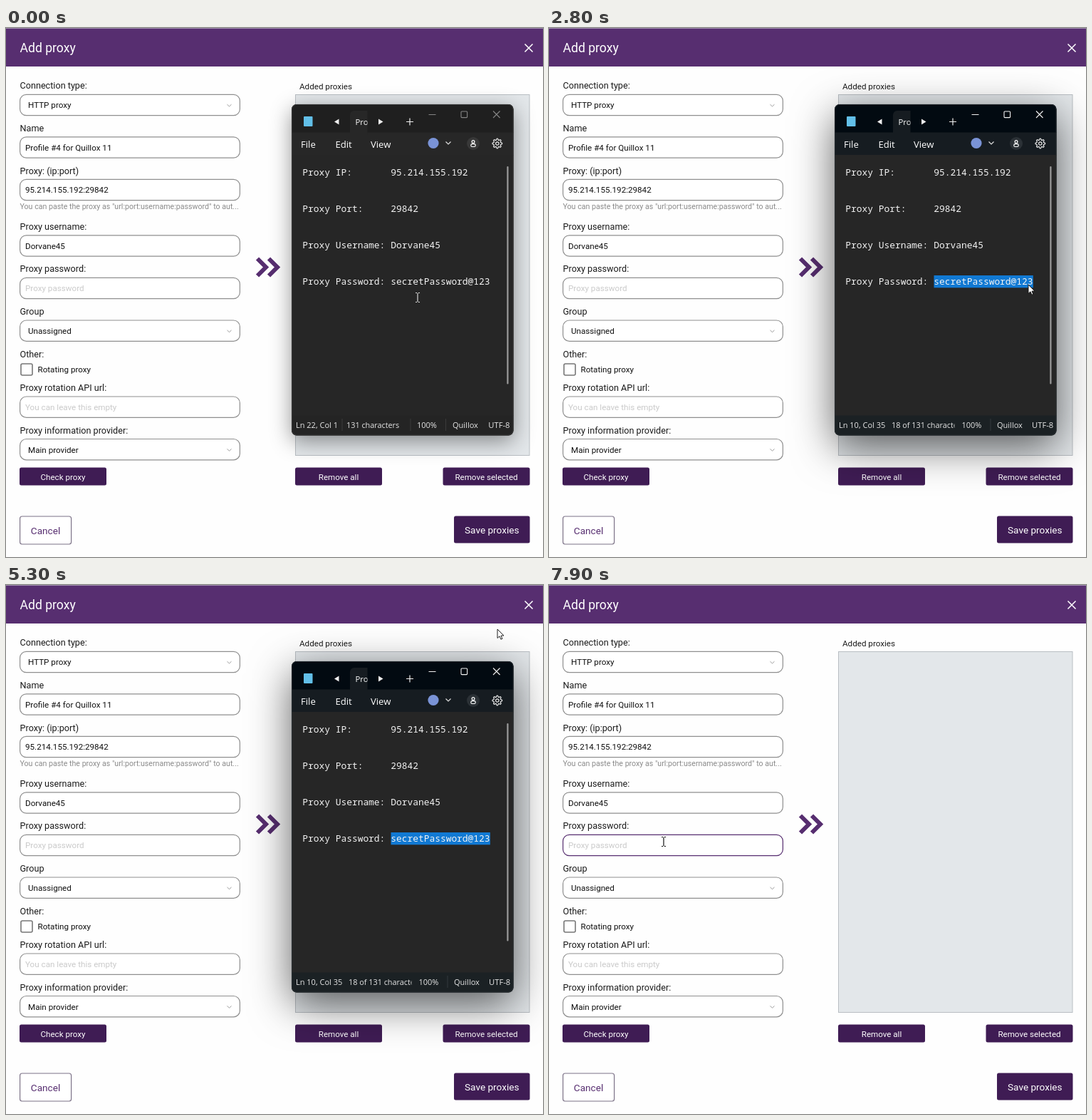
These frames come from a looping animation (754x742 px, 8000 ms). An HTML page with a canvas:

```html
<!DOCTYPE html>
<html lang="en">
<head>
<meta charset="utf-8">
<title>Add proxy</title>
<style>
html, body { margin: 0; width: 100%; height: 100%; overflow: hidden; background: #fff; }
canvas { display: block; width: 754px; height: 742px; }
</style>
</head>
<body>
<canvas id="stage"></canvas>
<script>
const W = 754, H = 742, LOOP = 8000;
const cv = document.getElementById('stage');
const dpr = window.devicePixelRatio || 1;
cv.width = W * dpr;
cv.height = H * dpr;
const c = cv.getContext('2d');

const UI = 'Roboto, sans-serif';
const WIN = '"Open Sans", sans-serif';
const MONO = '"Noto Sans Mono", monospace';
const PURPLE = '#572e70', DARK = '#3f1c54';
const USER = 'Dorvane45', SECRET = 'secretPassword@123';
const CHAR = 7.74, SEL_X = 540.5;

// Event times in ms
const PRESS = 1100, RELEASE = 2400, MENU_OPEN = 3500, MENU_CLOSE = 4850, CLICK = 7500;

// Pointer stops: time, x, y
const PATH = [
  [0, 578, 378], [400, 578, 378], [1000, 540, 357], [1150, 540, 357],
  [1500, 578, 361], [2250, 684, 363], [2450, 684, 363], [2750, 673, 360],
  [3000, 673, 360], [3300, 645, 356], [3800, 645, 356], [4300, 665, 175],
  [4700, 690, 62], [5500, 690, 62], [6900, 162, 360], [7400, 162, 360],
  [7600, 161, 360], [8000, 161, 360]
];

const clamp = v => Math.max(0, Math.min(1, v));
const smooth = v => v * v * (3 - 2 * v);

function pointer(t) {
  let i = 0;
  while (i < PATH.length - 2 && t >= PATH[i + 1][0]) i++;
  const [t0, x0, y0] = PATH[i], [t1, x1, y1] = PATH[i + 1];
  const k = smooth(clamp((t - t0) / (t1 - t0)));
  return { x: x0 + (x1 - x0) * k, y: y0 + (y1 - y0) * k };
}

function text(s, x, y, size, color, font = UI, align = 'left') {
  c.font = size + 'px ' + font;
  c.fillStyle = color;
  c.textAlign = align;
  c.fillText(s, x, y + size * 0.355);
}

function rect(x, y, w, h, color) {
  c.fillStyle = color;
  c.fillRect(x, y, w, h);
}

function round(x, y, w, h, r, fill, stroke, lw = 1) {
  c.beginPath();
  c.roundRect(x, y, w, h, r);
  if (fill) { c.fillStyle = fill; c.fill(); }
  if (stroke) { c.strokeStyle = stroke; c.lineWidth = lw; c.stroke(); }
}

function line(color, lw, ...lists) {
  c.strokeStyle = color;
  c.lineWidth = lw;
  c.beginPath();
  for (const p of lists)
    for (let i = 0; i < p.length; i += 2)
      i ? c.lineTo(p[i], p[i + 1]) : c.moveTo(p[0], p[1]);
  c.stroke();
}

function circle(x, y, r, fill, stroke, lw = 1) {
  c.beginPath();
  c.arc(x, y, r, 0, 7);
  if (fill) { c.fillStyle = fill; c.fill(); }
  if (stroke) { c.strokeStyle = stroke; c.lineWidth = lw; c.stroke(); }
}

function poly(fill, ...p) {
  c.fillStyle = fill;
  c.beginPath();
  for (let i = 0; i < p.length; i += 2) c.lineTo(p[i], p[i + 1]);
  c.closePath();
  c.fill();
}

function clipped(x, y, w, h, draw) {
  c.save();
  c.beginPath();
  c.rect(x, y, w, h);
  c.clip();
  draw();
  c.restore();
}

// Centre y, content, kind
const FIELDS = [
  [108, 'HTTP proxy', 'select'],
  [167.5, 'Profile #4 for Quillox 11'],
  [227, '95.214.155.192:29842'],
  [305.5, USER],
  [365, 'Proxy password', 'hint'],
  [424.7, 'Unassigned', 'select'],
  [531.7, 'You can leave this empty', 'hint'],
  [591.2, 'Main provider', 'select']
];
const LABELS = [
  [81, 'Connection type:'], [140.5, 'Name'], [200.5, 'Proxy: (ip:port)'],
  [278.5, 'Proxy username:'], [338, 'Proxy password:'], [398, 'Group'],
  [457.5, 'Other:'], [505, 'Proxy rotation API url:'], [564.5, 'Proxy information provider:']
];

function button(x, y, w, h, label, size) {
  round(x, y, w, h, 2.5, DARK);
  text(label, x + w / 2, y + h / 2 + 0.5, size, '#fff', UI, 'center');
}

function form(t) {
  rect(0, 0, W, H, '#fefefe');
  rect(0, 0, W, 54, PURPLE);
  rect(0, 0, W, 1, '#a18fae');
  text('Add proxy', 19.5, 28, 17.6, '#fff');
  line('#fff', 1.5, [728.5, 22.5, 739.5, 33.5], [739.5, 22.5, 728.5, 33.5]);

  for (const [y, s] of LABELS) text(s, 19.5, y, 12.65, '#1c1c1c');
  for (const [y, s, kind] of FIELDS) {
    const on = t >= CLICK && s === 'Proxy password';
    round(19.6, y - 14.7, 308.8, 29.4, 9, '#fff', on ? PURPLE : '#8f8f8f', 1.2);
    text(s, kind === 'select' ? 31 : 27, y + 0.3, 11.65, kind === 'hint' ? '#cacaca' : '#111');
    if (kind === 'select') line('#9a9a9a', 1, [310.5, y - 0.8, 313.5, y + 2, 316.5, y - 0.8]);
  }
  text('You can paste the proxy as "url:port:username:password" to aut...', 19.5, 250, 10.65, '#8a8a8a');
  round(21, 471, 16, 16, 2, '#fff', '#777', 1.6);
  text('Rotating proxy', 44.5, 479, 11.65, '#111');

  text('Added proxies', 412, 81.5, 11.65, '#1c1c1c');
  rect(406, 93, 329.5, 507, '#b9bec3');
  rect(407, 94, 327.5, 505, '#e3e7ea');

  c.lineJoin = 'miter';
  line(PURPLE, 6, [353, 323.5, 365, 335.5, 353, 347.5], [369, 323.5, 381, 335.5, 369, 347.5]);

  button(19, 616.5, 122, 25, 'Check proxy', 11.6);
  button(406, 616.5, 122, 25, 'Remove all', 11.6);
  button(613.5, 616.5, 122, 25, 'Remove selected', 11.6);
  button(629, 684.5, 106.5, 38, 'Save proxies', 13.6);
  round(19.6, 685, 72, 39, 3, '#fff', '#7d7388', 1.2);
  text('Cancel', 55.5, 704.8, 13.6, PURPLE, UI, 'center');
}

function gear(x, y) {
  c.strokeStyle = '#e4e4e4';
  c.lineWidth = 1.2;
  c.beginPath();
  for (let i = 0; i <= 64; i++) {
    const a = i / 64 * Math.PI * 2, r = 5.9 + 0.9 * Math.tanh(3 * Math.cos(a * 8));
    c.lineTo(x + r * Math.cos(a), y + r * Math.sin(a));
  }
  c.stroke();
  circle(x, y, 2.2, null, '#e4e4e4', 1.2);
}

function selected(t) {
  if (t < PRESS) return 0;
  const x = pointer(Math.min(t, RELEASE)).x;
  return Math.max(0, Math.min(SECRET.length, Math.round((x - SEL_X) / CHAR - 0.4)));
}

function notepad(t) {
  const focus = t >= PRESS, n = selected(t);
  const bar = focus ? '#020a11' : '#1f1f1f';
  const tab = focus ? '#161c21' : '#272727';
  const foot = focus ? '#1b2124' : '#242424';
  const btn = focus ? '#f2f2f2' : '#858585';

  c.save();
  c.shadowColor = focus ? 'rgba(0,0,0,.62)' : 'rgba(0,0,0,.42)';
  c.shadowBlur = (focus ? 58 : 30) * dpr;
  c.shadowOffsetY = (focus ? 16 : 8) * dpr;
  round(401, 107, 311.5, 464.5, 7, '#262626');
  c.restore();

  c.save();
  c.beginPath();
  c.roundRect(401, 107, 311.5, 464.5, 7);
  c.clip();
  rect(401, 107, 312, 40, bar);
  rect(401, 146.5, 312, 32, tab);
  rect(401, 178, 312, 366, '#262626');
  rect(401, 543.5, 312, 29, foot);
  round(483, 116, 24.5, 34, [6, 0, 0, 0], tab);

  round(418, 124, 12.5, 14, 1, '#62bfe8');
  poly('#eee', 461, 131.5, 467.5, 127.5, 467.5, 135.5);
  poly('#eee', 529.5, 131.5, 523, 127.5, 523, 135.5);
  clipped(483, 116, 24.5, 30, () => text('Proxy', 490.5, 131.5, 11.3, '#fff', WIN));
  line('#eee', 1.2, [562, 131.5, 572, 131.5], [567, 126.5, 567, 136.5]);
  line(btn, 1.1, [593.5, 121.5, 603.5, 121.5]);
  round(639, 117, 8.6, 8.6, 1, null, btn, 1.1);
  line(btn, 1.1, [684, 116.5, 693.5, 126], [693.5, 116.5, 684, 126]);

  text('File', 414, 163.5, 13.1, '#fff', WIN);
  text('Edit', 462.5, 163.5, 13.1, '#fff', WIN);
  text('View', 512, 163.5, 13.1, '#fff', WIN);
  circle(600, 161.5, 7.6, '#7a93d6');
  line('#ddd', 1.2, [617.5, 159.5, 621, 163, 624.5, 159.5]);
  circle(656, 162, 9, focus ? '#2b3136' : '#383838');
  circle(656, 159.6, 1.9, null, '#fff', 1.2);
  round(652.8, 162.7, 6.4, 3.8, 1.8, null, '#fff', 1.2);
  gear(689.8, 162);

  const rows = [
    ['IP:', '95.214.155.192'], ['Port:', '29842'], ['Username:', USER], ['Password:', SECRET]
  ];
  if (n) rect(SEL_X, 347, n * CHAR, 17.3, '#1179d3');
  rows.forEach(([key, val], i) => {
    const y = 202.7 + i * 51;
    text('Proxy ' + key, 416.3, y, 12.9, '#f3f3f3', MONO);
    text(val, 540.3, y, 12.9, '#f3f3f3', MONO);
  });
  round(703.3, 194, 2.2, 305.5, 1, '#9b9b9b');

  status(focus, n);
  c.restore();
  round(401.4, 107.4, 310.7, 463.7, 7, null, focus ? '#30363a' : '#444', 0.8);
}

function status(focus, n) {
  const y = 557, size = 11, col = '#e6e6e6';
  const wide = n >= 10 ? 2 : n ? 1 : 0;
  const shift = [0, 1, 2.5][wide];
  const where = focus ? 'Ln 10, Col ' + (17 + n) : 'Ln 22, Col 1';
  const count = n ? n + ' of 131 characters' : '131 characters';
  text(where, 407, y, size, col, WIN);
  const cx = 478 + [0, 2, 3][wide];
  clipped(cx, 546, 567 + shift - cx, 22, () => text(count, cx, y, 10.85, col, WIN));
  text('100%', 577 + shift, y, size, col, WIN);
  clipped(620, 546, 46 + shift * 0.4, 22, () => text('Quillox (CRLF)', 627 + shift * 0.8, y, size, col, WIN));
  text('UTF-8', 677.3 + shift * 0.3, y, 11.2, col, WIN);
  const rule = focus ? '#343a3e' : '#3b3b3b';
  for (const x of focus ? [617 + shift] : [471.5, 567.5, 617]) rect(x, 548, 1, 17, rule);
}

const ITEMS = [
  [31, 'Cut'], [70, 'Copy'], [108.5, 'Paste'], [147, 'Delete'], [189, 'Select all'],
  [231, 'Search with'], [272.5, 'Rewrite'], [311.5, 'Custom rewrite'],
  [353.5, 'Spelling'], [395, 'Display and input']
];

function icon(name, y) {
  const x = 666.5, w = '#f0f0f0';
  const ln = (...p) => line(w, 1.2, ...p);
  if (name === 'Cut') {
    ln([663, y - 8, 669, y + 3], [670, y - 8, 664, y + 3]);
    circle(662.5, y + 4.6, 2.3, null, w, 1.2);
    circle(670.5, y + 4.6, 2.3, null, w, 1.2);
  } else if (name === 'Copy') {
    round(663.5, y - 7.5, 9, 11.5, 2, null, w, 1.2);
    ln([660.5, y - 4.5, 660.5, y + 6, 669, y + 6]);
  } else if (name === 'Paste') {
    round(660, y - 6.5, 11, 13, 1.5, null, w, 1.2);
    round(663, y - 8.5, 5, 3.5, 1, '#2c2c2c', w, 1.2);
    round(666.5, y - 2, 6.5, 9, 1.5, '#2c2c2c', w, 1.2);
  } else if (name === 'Delete') {
    ln([659.5, y - 5, 673.5, y - 5], [661, y - 5, 662.5, y + 7, 670.5, y + 7, 672, y - 5],
      [664, y - 5, 664.5, y - 7.5, 668.5, y - 7.5, 669, y - 5],
      [665, y - 2, 665, y + 4], [668, y - 2, 668, y + 4]);
  } else if (name === 'Select all') {
    c.setLineDash([2, 1.6]);
    c.strokeStyle = w;
    c.lineWidth = 1.3;
    c.strokeRect(659.5, y - 7, 14, 14);
    c.strokeRect(662.5, y - 4, 8, 8);
    c.setLineDash([]);
  } else if (name === 'Search with') {
    circle(x, y - 1, 6, w);
  } else if (name === 'Rewrite') {
    ln([661, y + 3, 670, y - 7, 673, y - 4, 664, y + 5, 660, y + 6, 661, y + 3],
      [659.5, y - 1, 663, y - 4], [667, y + 6, 670, y + 3.5, 671, y + 6, 674, y + 5]);
  } else if (name === 'Spelling') {
    text('ABC', x, y - 4.5, 7.3, w, 'bold ' === '' ? '' : WIN, 'center');
    ln([663, y + 2, 666, y + 5, 671, y - 0.5]);
  } else if (name === 'Display and input') {
    ln([660.5, y + 4, 666.5, y - 6, 672.5, y + 4]);
  }
}

function menu(t, p) {
  if (t < MENU_OPEN || t > MENU_CLOSE + 90) return;
  const k = 1 - Math.pow(1 - clamp((t - MENU_OPEN) / 250), 2);
  const top = 330 - 350 * k;
  c.save();
  c.globalAlpha = t > MENU_CLOSE ? 1 - clamp((t - MENU_CLOSE) / 90) : clamp((t - MENU_OPEN) / 80);
  c.beginPath();
  c.rect(600, top, 154, 470 - top);
  c.clip();
  c.save();
  c.shadowColor = 'rgba(0,0,0,.35)';
  c.shadowBlur = 16 * dpr;
  c.shadowOffsetY = 5 * dpr;
  round(644, -20, 130, 435, 7, '#2b2b2b');
  c.restore();
  round(644.4, -20, 130, 434.6, 7, null, '#1d1d1d', 0.8);
  for (const y of [9, 167, 209, 250.5, 331.5, 373.5]) rect(645, y, 110, 1, '#3d3d3d');
  for (const [y, s] of ITEMS) {
    if (p.x > 648 && Math.abs(p.y - y) < 18) round(648, y - 18, 120, 36, 4, '#383838');
    text(s, 685.5, y, 12.9, '#fff', WIN);
    icon(s, y);
  }
  c.restore();
}

function arrow(x, y) {
  c.save();
  c.translate(x, y);
  c.scale(0.78, 0.78);
  c.beginPath();
  [[0, 0], [0, 16], [3.8, 12.6], [6.3, 18.2], [8.8, 17.1], [6.4, 11.7], [11.4, 11.5]]
    .forEach(q => c.lineTo(q[0], q[1]));
  c.closePath();
  c.fillStyle = '#fff';
  c.fill();
  c.strokeStyle = '#111';
  c.lineWidth = 1.2;
  c.stroke();
  c.restore();
}

function ibeam(x, y, color) {
  line(color, 1.2, [x, y - 6, x, y + 6],
    [x - 3, y - 6.5, x - 0.8, y - 6.5], [x + 0.8, y - 6.5, x + 3, y - 6.5],
    [x - 3, y + 6.5, x - 0.8, y + 6.5], [x + 0.8, y + 6.5, x + 3, y + 6.5]);
}

function cursor(t, p) {
  const { x, y } = p;
  const menuUp = t >= MENU_OPEN && t < MENU_CLOSE;
  const overPad = t < CLICK && x > 401 && x < 712 && y > 178 && y < 544;
  const overSel = t > RELEASE && x > SEL_X && x < 680 && y > 347 && y < 364;
  const overField = x > 19 && x < 328 &&
    FIELDS.some(f => f[2] !== 'select' && Math.abs(y - f[0]) < 15);
  if (overPad && !overSel && !menuUp) ibeam(x, y, '#d8d8d8');
  else if (overField) ibeam(x, y, '#111');
  else arrow(x, y);
}

function draw(t) {
  c.setTransform(dpr, 0, 0, dpr, 0, 0);
  const p = pointer(t);
  form(t);
  if (t < CLICK) notepad(t);
  menu(t, p);
  cursor(t, p);
}

const start = performance.now();
function tick() {
  draw((performance.now() - start) % LOOP);
  requestAnimationFrame(tick);
}
tick();
</script>
</body>
</html>
```
